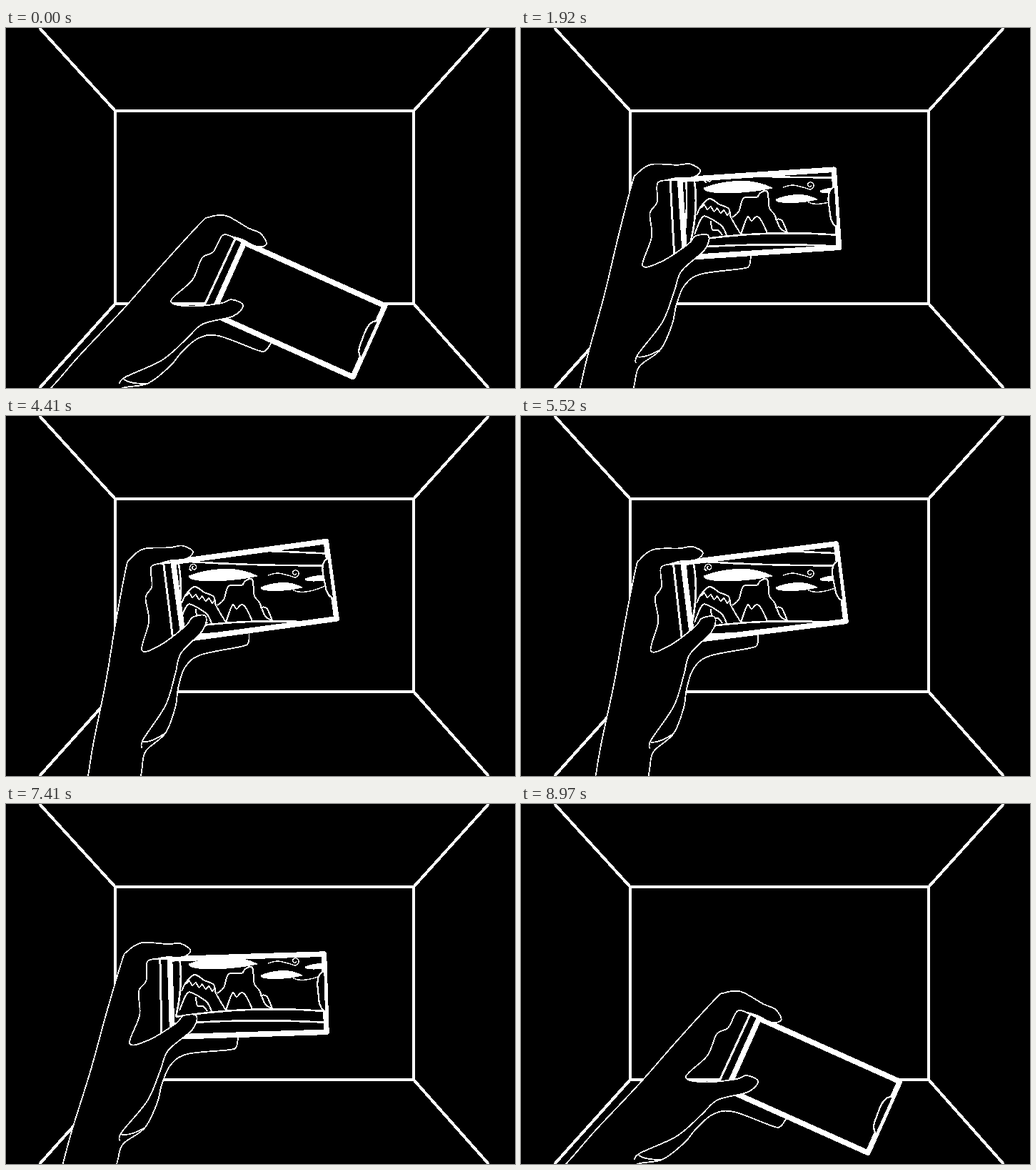
Animation of 713x504 px, one loop 9000 ms. Source, as an HTML page:

```html
<!DOCTYPE html>
<html lang="en">
<head>
<meta charset="utf-8">
<title>Hidden landscape</title>
<style>
  html, body { margin: 0; width: 100%; height: 100%; overflow: hidden; background: #000; }
  svg { display: block; width: 100vw; height: 100vh; }
</style>
</head>
<body>
<svg id="stage" viewBox="0 0 713 504" fill="none" stroke="#fff" stroke-linejoin="round" shape-rendering="crispEdges">
  <defs><clipPath id="lens"><path id="glass" d="M251 231L466.5 246L459 355L243.5 340Z"/></clipPath></defs>
  <path stroke-width="4" d="M153 116H571V386H153ZM47 0L153 116M676 0L571 116M676 504L571 386M47 504L153 386"/>
  <g id="back"></g>
  <g clip-path="url(#lens)"><g id="world"></g></g>
  <g id="front"></g>
</svg>
<script>
const LOOP = 9000;
const $ = id => document.getElementById(id);

function add(parent, d, width, fill = 'none') {
  const el = document.createElementNS('http://www.w3.org/2000/svg', 'path');
  const attrs = { d, fill, 'stroke-width': width };
  for (const key in attrs) el.setAttribute(key, attrs[key]);
  $(parent).append(el);
}

// Smooth curve through "x,y x,y ..." points.
function curve(text) {
  const p = text.trim().split(/\s+/).map(s => s.split(',').map(Number));
  let d = 'M' + p[0];
  for (let i = 0; i < p.length - 1; i++) {
    const a = p[i - 1] || p[i], b = p[i], c = p[i + 1], e = p[i + 2] || c;
    d += `C${b[0] + (c[0] - a[0]) / 6},${b[1] + (c[1] - a[1]) / 6} ` +
         `${c[0] - (e[0] - b[0]) / 6},${c[1] - (e[1] - b[1]) / 6} ${c}`;
  }
  return d;
}

// Points of f(0) ... f(n - 1) as curve text.
const plot = (n, f) => Array.from({ length: n }, (_, i) => f(i).join()).join(' ');

const spiral = (x, y, r, from, turns) => plot(12, i => {
  const a = from + turns * 2 * Math.PI * i / 11, s = r * (1 - i / 14);
  return [x + s * Math.cos(a), y + s * Math.sin(a)];
});

// Flat-bottomed cloud with pointed ends.
function cloud(x, y, w, h) {
  add('world', `M${x - w} ${y}C${x - w / 2} ${y - h} ${x + w / 3} ${y - h * 1.8} ${x + w} ${y}` +
    `C${x + w / 3} ${y + h * .8} ${x - w} ${y + h * 1.2} ${x - w} ${y}Z`, 1, '#fff');
}

// Landscape, fixed in the room and seen only through the screen.
function buildWorld() {
  add('world', 'M228 184Q380 189 480 194M241 203Q360 211 480 209', 2.6);
  add('world', 'M238 298Q350 280 470 292M226 308Q350 299 470 307', 2.6);
  add('world', 'M241 203Q250 245 238 298M229 190Q236 245 227 308', 2.6);
  [
    '246,262 252,250 264,239 278,247 291,253 294,265 308,289',
    '243,289 253,266 262,265 281,277 288,290',
    '266,270 268,282 276,283 282,290',
    '296,265 305,257 312,238 330,237 335,231 345,229 348,252 355,261 363,280 374,287',
    '308,289 317,265 323,270 330,264 337,270 345,287',
    '356,268 365,269 373,286'
  ].forEach(ridge => add('world', curve(ridge), 2));
  const snow = plot(10, i => [252 + 4.6 * i, 252 + 1.25 * i - (i % 2) * 6]);
  add('world', 'M' + snow, 1.8);

  cloud(304, 224, 48, 9);
  cloud(386, 240, 29, 6);
  cloud(438, 228, 19, 4);
  add('world', curve('367,223 380,220 395,223 ' + spiral(405, 220, 6, 1.6, -1.3)), 1.4);
  add('world', curve('256,214 ' + spiral(263, 212, 6, 2.2, 1.4)), 1.4);
  add('world', 'M402 244Q418 251 447 238', 1.4);
}

// Black shape whose outline stays open; closing completes only the fill.
function solid(parent, d, closing = '') {
  add(parent, d + closing, 0, '#000');
  add(parent, d, 1.8);
}

function buildHand() {
  const fingers = curve(`138,540 150,504 160,482 192,463 213,430 222,405
    237,379 262,366 320,366 331,363 335,350`);
  solid('back', fingers, 'L250 330L120 470L55 545Z');
  add('back', 'M157 468Q168 473 192 463', 1.8);
  add('back', 'M237 229L466 246L459 355L228 339Z', 0, '#000');

  add('front', 'M233 229L251 231M237.5 229L229 334', 3);
  add('front', $('glass').getAttribute('d'), 7.6);
  add('front', 'M464 270Q454 272 453 290V312Q454 322 460 326', 2.2, '#000');
  solid('front', curve(`55,545 72,504 90,457 125,375 154,300 184,227 192,215 214,204.5
    250,210 268,211 281,222 270,230 247,228 233,229 219,232 215,258 203,272 201,305
    183,343 210,341 250,322 262,312 280,314 272,333 236,358 222,385 200,425 160,465 155,477`));
}

// Key poses: time, phone corner x, y and turn. The second half plays them backwards.
const poses = [
  [0, 534, 388.5, 20.2],
  [900, 469.5, 244.5, 0],
  [2400, 436.5, 186.5, -9.4],
  [4500, 451, 173.5, -11.7]
];

function secant(i, k) {
  const a = poses[i], b = poses[i + 1];
  return a && b ? (b[k] - a[k]) / (b[0] - a[0]) : 0;
}

function slope(i, k) {
  const before = secant(i - 1, k), after = secant(i, k);
  return before * after > 0 ? 2 * before * after / (before + after) : 0;
}

// Smooth interpolation that rests at both ends and never overshoots.
function poseAt(t, k) {
  let i = 0;
  while (i < poses.length - 2 && t > poses[i + 1][0]) i++;
  const a = poses[i], b = poses[i + 1], span = b[0] - a[0], u = (t - a[0]) / span, v = 1 - u;
  return v * v * (1 + 2 * u) * a[k] + u * u * (3 - 2 * u) * b[k] +
    span * u * v * (v * slope(i, k) - u * slope(i + 1, k));
}

function draw(time) {
  const t = time % LOOP, half = Math.min(t, LOOP - t);
  const [x, y, turn] = [1, 2, 3].map(k => poseAt(half, k));
  const move = `translate(${x} ${y}) rotate(${turn}) translate(-469.5 -244.5)`;
  for (const id of ['back', 'front', 'glass']) $(id).setAttribute('transform', move);
}

buildWorld();
buildHand();
const start = performance.now();
function tick() {
  draw(performance.now() - start);
  requestAnimationFrame(tick);
}
draw(0);
requestAnimationFrame(tick);
</script>
</body>
</html>
```
